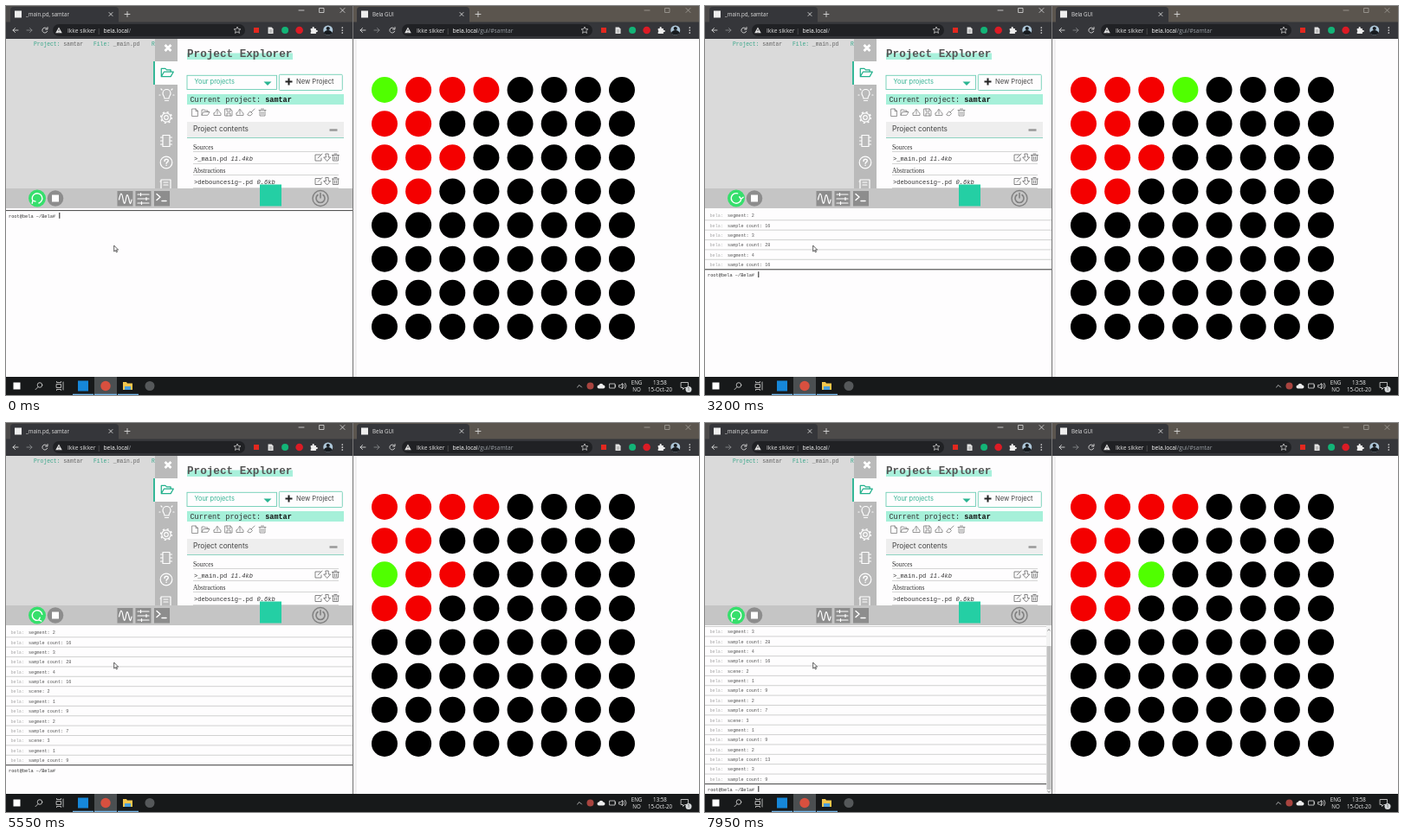
Animation of 800 by 450 pixels, one loop 8000 ms. Source, as an HTML page:

```html
<!DOCTYPE html>
<html lang="en">
<head>
<meta charset="utf-8">
<title>Sample sequencer</title>
<style>
html, body { margin: 0; width: 100%; height: 100%; overflow: hidden; background: #fff; }
svg { display: block; width: 800px; height: 450px; }
text { font-family: "Open Sans", "Noto Sans", sans-serif; white-space: pre; }
.mono { font-family: "Liberation Mono", monospace; }
.geo { font-family: Inter, sans-serif; }
.serif { font-family: "Liberation Serif", serif; }
.line { fill: none; stroke-linecap: round; stroke-linejoin: round; }
</style>
</head>
<body>
<svg id="stage" viewBox="0 0 800 450">
  <defs>
    <clipPath id="page"><rect y="38" width="400" height="173"/></clipPath>
    <clipPath id="console"><rect y="234" width="400" height="195.5"/></clipPath>
    <clipPath id="info"><rect y="38" width="172" height="20"/></clipPath>
    <g id="pencil" class="line"><path d="M2-3H-4V4H3V1M-1 1L4-4"/></g>
    <g id="arrow" class="line"><path d="M-1.5-4H1.5V0H4L0 4.5L-4 0H-1.5Z"/></g>
    <g id="bin" class="line"><path d="M-3-2.5V4H3V-2.5M-4-2.5H4M-1.5-4H1.5M-1-.5V2.5M1-.5V2.5"/></g>
    <g id="folder" class="line"><path d="M-4 3V-3H-1L0-2H3V-.5M-4 3L-2-.5H5L3 3Z"/></g>
    <g id="tray" class="line"><path d="M-4 1V3.5H4V1L2-.5M-4 1L-2-.5M0 2V-3.5M-2-1.5L0-3.5L2-1.5"/></g>
  </defs>
  <rect width="800" height="450" fill="#fefdfe"/>

  <g id="windows"></g>

  <g clip-path="url(#page)">
    <rect y="38" width="173" height="174" fill="#dadada"/>
    <g font-size="6.35" clip-path="url(#info)" fill="#666">
      <text class="mono" x="32" y="46.3"><tspan fill="#3aa78b">Project:</tspan> samtar</text>
      <text class="mono" x="101" y="46.3"><tspan fill="#3aa78b">File:</tspan> _main.pd</text>
      <text class="mono" x="168" y="46.3" fill="#3aa78b">Ru</text>
    </g>
    <rect x="172" y="38" width="26" height="174" fill="#bababa"/>
    <rect x="172" y="64" width="27" height="27" fill="#fefdfe"/>
    <rect x="170" y="64" width="2" height="27" fill="#35b898"/>
    <g class="line" stroke="#fff" stroke-width="1.2">
      <path d="M183.500 45l7 7m0-7l-7 7" stroke-width="2.800" stroke-linecap="butt"/>
      <use href="#folder" transform="translate(185.5 77) scale(1.55)" stroke="#22b08c" stroke-width=".8"/>
      <path d="M183 107c0-3-2-3-2-6a4.5 4.5 0 0 1 9 0c0 3-2 3-2 6zM183.5 109.5h4M178 103h-1M193 103h1M180 97l-1-1M191 97l1-1"/>
      <g transform="translate(185 129)">
        <circle r="2.3"/><circle r="5.2"/><circle r="6.3" stroke-width="1.6" stroke-dasharray="2 2.95" stroke-linecap="butt"/>
      </g>
      <path d="M181 149.500h8v13h-8zM178.500 152h2.500m-2.500 4h2.500m-2.500 4h2.500m8-8h2.500m-2.500 4h2.500m-2.500 4h2.500"/>
      <circle cx="185" cy="181" r="6.8"/>
      <path d="M183 179.500c0-3 4.300-3 4.300-.5c0 1.800-2.200 1.500-2.200 3.300m0 2v.1" stroke-width="1.4"/>
      <path d="M179 212v-11h11v11m-11-9h-1m4 1h5m-5 3h5"/>
    </g>

    <rect x="209" y="54.500" width="122" height="7.500" fill="#a8f0db"/>
    <text class="mono" x="209" y="59" font-size="12.65" font-weight="700" fill="#555">Project Explorer</text>
    <g fill="#fefdfe" stroke="#6fceb5" stroke-width=".9">
      <rect x="209" y="80.300" width="103.500" height="16.200"/>
      <rect x="315.300" y="79.300" width="73" height="18.200" rx="1"/>
    </g>
    <path d="M297.500 87.500h9l-4.500 4.500z" fill="#2bb592"/>
    <text class="geo" x="217.500" y="90.300" font-size="7.400" fill="#35b393">Your projects</text>
    <path d="M322.500 87.500h8m-4-4v8" stroke="#222" stroke-width="2"/>
    <text class="geo" x="335" y="90.300" font-size="7.600" fill="#444">New Project</text>
    <rect x="209" y="102" width="181" height="12" fill="#a6f0d9"/>
    <text class="mono" x="212.500" y="110.800" font-size="8.500" fill="#333">Current project: <tspan font-weight="700" fill="#111">samtar</tspan></text>
    <g class="line" stroke="#777" stroke-width=".75">
      <path d="M215 119h4l2.500 2.500v6h-6.500zM219 119v2.500h2.500"/>
      <use href="#folder" x="230" y="123"/>
      <use href="#tray" x="244" y="123"/>
      <path d="M253 119h6l2 2v6h-8zM255 119v3h4v-3M255 127v-3h4v3"/>
      <use href="#tray" x="270" y="123"/>
      <path d="M287 119l-4 4m-1-1l2.500 2.500l-2.500 2.500l-3-1z"/>
      <use href="#bin" x="296" y="123"/>
    </g>
    <rect x="209" y="134" width="181" height="18" fill="#eee"/>
    <path d="M209 152.500H390" stroke="#8fd3c2"/>
    <text class="geo" x="216" y="145.300" font-size="8.300" fill="#444">Project contents</text>
    <path d="M373.500 143.500h9" stroke="#999" stroke-width="2.500"/>
    <g fill="#333" font-size="7.400">
      <text class="serif" x="216" y="166">Sources</text>
      <text class="serif" x="216" y="193">Abstractions</text>
      <text class="mono" x="217" y="178.600" font-size="7.100">&gt;_main.pd <tspan font-style="italic">11.4kb</tspan></text>
      <text class="mono" x="217" y="206" font-size="7.100">&gt;debouncesig~.pd <tspan font-style="italic">0.6kb</tspan></text>
    </g>
    <path d="M216 168.500H384M216 182.500H384M216 195.500H384M216 210.500H384" stroke="#c4c4c4" stroke-width=".7"/>
    <g id="fileIcons" stroke="#666" stroke-width=".8"></g>
  </g>

  <rect y="211" width="400" height="23" fill="#c5c5c5"/>
  <circle cx="36" cy="222.500" r="10" fill="#36df6c"/>
  <g id="spinner" class="line" stroke="#fff" stroke-width="1.400">
    <path d="M-5 3A5.800 5.800 0 1 1 2 5.500M-5.800 5.800L-5 2.700L-2 3.600"/>
  </g>
  <circle cx="57" cy="222.500" r="9.300" fill="#8d8d8d"/>
  <rect x="53" y="218.500" width="8" height="8" fill="#fff"/>
  <g fill="#8d8d8d">
    <rect x="128.500" y="214" width="18" height="17.500"/>
    <rect x="149.500" y="214" width="18" height="17.500"/>
    <rect x="171" y="214" width="18" height="17.500"/>
  </g>
  <g class="line" stroke="#fff" stroke-width="1.200">
    <path d="M130.500 224c2-9 3-9 4.500-1s2.500 6 3.500 0s2-6 3.500 1s2 5 3 0"/>
    <path d="M152 218h13m-13 5h13m-13 5h13M155.500 216.500v3M162 221.500v3M156.500 226.500v3"/>
    <path d="M174 217.500l4 3.500l-4 3.500M180 225.500h5" stroke-width="1.500"/>
  </g>
  <rect x="293" y="206.500" width="25" height="25" fill="#24cfa4"/>
  <g class="line" stroke="#808080" stroke-width="1.400">
    <circle cx="363" cy="222.500" r="9"/>
    <path d="M360 218.500a5 5 0 1 0 6 0M363 216.500v5.500" stroke-width="1.600"/>
  </g>

  <g clip-path="url(#console)">
    <rect y="234" width="400" height="196" fill="#fefdfe"/>
    <g id="scroller">
      <g id="rows"></g>
      <g id="prompt">
        <rect y="236" width="400" height="1.100" fill="#555"/>
        <text class="mono" x="3" y="244.700" font-size="5.300" fill="#333">root@bela ~/Bela#</text>
        <rect id="caret" x="61.300" y="239" width="1" height="6.800" fill="#222"/>
      </g>
    </g>
    <g id="scrollbar">
      <rect x="394" y="234" width="6" height="196" fill="#f3f3f3"/>
      <rect x="394.500" y="258" width="5" height="166" fill="#c2c2c2"/>
      <path d="M395.500 240.500l1.500-2l1.500 2M395.500 425.500l1.500 2l1.500-2" fill="none" stroke="#777" stroke-width=".8"/>
    </g>
  </g>
  <rect x="400" width="1" height="429" fill="#777"/>
  <rect x="401" y="38" width="4" height="391" fill="#f1f0f1"/>

  <g id="grid"></g>
  <path d="M124.700 277v7l1.600-1.500l1.100 2.400l1.100-.5l-1.100-2.300h2.200z" fill="#fff" stroke="#222" stroke-width=".7"/>

  <g id="taskbar">
    <rect y="429" width="800" height="21" fill="#17191a"/>
    <rect x="102" y="429" width="26" height="21" fill="#4b4f51"/>
    <rect x="8.500" y="435.500" width="8" height="8" fill="#fff"/>
    <g class="line" stroke="#ddd" stroke-width=".8">
      <circle cx="39" cy="438.500" r="2.800"/><path d="M37 440.700l-3 3"/>
      <path d="M58.500 437.500h5v4h-5zM58.500 434.500v1h5v-1M58.500 444.500v-1h5v1M66 435v9"/>
      <path d="M659.500 441l2.500-2.500l2.500 2.500"/>
      <path d="M697 437h6v5h-6zM703.500 438.500v2"/>
      <path d="M708 438.500h1.500l2-2v6.500l-2-2h-1.500zM713 437.500q1.500 2 0 4M714.800 436.300q2.500 3.200 0 6.500"/>
      <path d="M779.500 435.500h8v6h-4l-2 2v-2h-2z"/>
    </g>
    <rect x="83" y="433.500" width="12" height="12" fill="#1687d9"/>
    <circle cx="115" cy="439.500" r="5.700" fill="#d8503f"/>
    <path d="M135 435h4l1 1.500h6v7.500h-11z" fill="#f4c64d"/>
    <path d="M137 440h7v4h-7z" fill="#4b9fdd"/>
    <circle cx="166" cy="439.500" r="5.500" fill="#55585a"/>
    <path d="M77 449.300h24M102 449.300h26M129 449.300h24" stroke="#76b9ed" stroke-width="1.300"/>
    <circle cx="674.500" cy="439.500" r="4" fill="#a8443f"/>
    <path d="M684.500 442.500a2 2 0 0 1 0-4a2.700 2.700 0 0 1 5 0a2 2 0 0 1 0 4z" fill="#eee"/>
    <circle cx="788" cy="443.500" r="3.500" fill="#d5d8da"/>
    <g fill="#eee" font-size="6.200" text-anchor="middle">
      <text x="728" y="437.500">ENG</text><text x="728" y="446.300">NO</text>
      <text x="755" y="437.500">13:58</text><text x="755" y="446.300">15-Oct-20</text>
      <text x="788" y="445.400" font-size="5" fill="#222">1</text>
    </g>
  </g>
</svg>
<script>
const LOOP = 8000, ROW = 11.37, BLINK = 530, GREEN_DELAY = 180;
const $ = id => document.getElementById(id);

// Each entry: time, scene, segment, sample count, whether the scene is announced.
const events = [
  [800, 1, 2, 16], [1480, 1, 3, 28], [2000, 1, 4, 16], [3550, 2, 1, 9, true],
  [4400, 2, 2, 7], [5000, 3, 1, 9, true], [5900, 3, 2, 13], [6420, 3, 3, 9]
];
const segments = [4, 2, 3, 2];

function browser(o) {
  const { x, width, strip, tab, tabWidth, title, path, omni, star, dim } = o;
  const right = x + width;
  const ext = i => star + 22 + i * 16.55;
  const ctl = dim ? '#a5a19b' : '#ddd';
  return `
    <rect x="${x}" width="${width}" height="38" fill="${strip}"/>
    <rect x="${x}" y="18.500" width="${width}" height="19.500" fill="#35363a"/>
    <path d="M${tab} 19V5q0-4 4-4h${tabWidth - 8}q4 0 4 4v14z" fill="#35363a"/>
    <rect x="${tab + 5}" y="5.500" width="8" height="8" fill="#eee"/>
    <text x="${tab + 18}" y="12" font-size="6.200" fill="#ddd">${title}</text>
    <g class="line" stroke="#d8d8d8" stroke-width=".9">
      <path d="M${tab + tabWidth - 11} 7.500l4 4m0-4l-4 4M${tab + tabWidth + 7} 9.500h6m-3-3v6"/>
      <path d="M${x + 14} 28h-6m2.500-2.500l-2.500 2.500l2.500 2.500"/>
      <path d="M${x + 24} 28h6m-2.500-2.500l2.500 2.500l-2.500 2.500" stroke="#85878a"/>
      <path d="M${x + 47.500} 26.500a3 3 0 1 0 .2 2.700M${x + 48} 24.500v2.500h-2.500"/>
    </g>
    <g class="line" stroke="${ctl}" stroke-width=".8">
      <path d="M${right - 63} 5h6M${right - 39} 2.500h5v5h-5zM${right - 15} 2.500l5 5m0-5l-5 5"/>
    </g>
    <rect x="${omni}" y="21" width="${star + 9 - omni}" height="14" rx="7" fill="#202124"/>
    <path d="M${omni + 7} 24.500l3.800 6.800h-7.600z" fill="#ddd"/>
    <path d="M${omni + 7} 27v2m0 1v.6" stroke="#222" stroke-width=".8"/>
    <text x="${omni + 17}" y="30.500" font-size="6.700" fill="#ddd">Ikke sikker<tspan fill="#777"> | </tspan><tspan fill="#fff"> bela.local</tspan><tspan fill="#9aa0a6">${path}</tspan></text>
    <path d="M${star} 24l1.100 2.600l2.800.2l-2.100 1.800l.7 2.800l-2.500-1.500l-2.500 1.500l.7-2.800l-2.100-1.800l2.800-.2z" fill="none" stroke="#ccc" stroke-width=".8"/>
    <rect x="${ext(0) - 3}" y="25" width="6" height="6" fill="#e3281f"/>
    <path d="M${ext(1) - 3} 24.500h4l2 2v5.500h-6z" fill="#e3e3e3"/>
    <path d="M${ext(1) - 1.500} 28h3m-3 2h3" stroke="#777" stroke-width=".7"/>
    <circle cx="${ext(2)}" cy="28" r="4" fill="#13b477"/>
    <circle cx="${ext(3)}" cy="28" r="4.300" fill="#dc1b25"/>
    <path d="M${ext(4) - 3.500} 26h2q-.6-2 1-2t1 2h2.200v2q2-.5 2 1t-2 1v2h-6.200v-2q1.500-.5 0-2z" fill="#eee"/>
    <circle cx="${ext(5)}" cy="28" r="5.500" fill="#adc6d8"/>
    <circle cx="${ext(5)}" cy="26" r="2.100" fill="#171b1f"/>
    <path d="M${ext(5) - 5} 31.500q1-3.500 5-3.500t5 3.500q-5 4-10 0" fill="#171b1f"/>
    <g fill="#ddd">${[25, 28, 31].map(y => `<circle cx="${ext(6)}" cy="${y}" r=".85"/>`).join('')}</g>`;
}

$('windows').innerHTML =
  browser({ x: 0, width: 401, strip: '#4d4b4a', tab: 5, tabWidth: 125, title: '_main.pd, samtar',
    path: '/', omni: 54, star: 267 }) +
  browser({ x: 401, width: 399, strip: '#5b554e', tab: 405, tabWidth: 130, title: 'Bela GUI',
    path: '/gui/#samtar', omni: 457, star: 668, dim: true });

$('fileIcons').innerHTML = [175, 202.5].map(y =>
  ['pencil', 'arrow', 'bin'].map((icon, i) => `<use href="#${icon}" x="${361 + i * 9.7}" y="${y}"/>`).join('')
).join('');

const lines = events.flatMap(([time, scene, segment, count, announced]) => [
  ...(announced ? [`scene: ${scene}`] : []), `segment: ${segment}`, `sample count: ${count}`
].map(label => ({ time, label })));

$('rows').innerHTML = lines.map(({ label }, i) => `<g transform="translate(0 ${i * ROW})">
  <text class="mono" x="5.500" y="244.200" font-size="5.150" fill="#aaa">bela:</text>
  <text class="mono" x="26" y="244.200" font-size="5.150" fill="#555">${label}</text>
  <path d="M0 247.800H400" stroke="#ccc" stroke-width=".9"/></g>`).join('');
const rows = [...$('rows').children];

const PITCH = 39.14;
$('grid').innerHTML = Array.from({ length: 64 }, (_, i) =>
  `<circle cx="${437 + i % 8 * PITCH}" cy="${97 + Math.floor(i / 8) * PITCH}" r="15"/>`).join('');
const dots = [...$('grid').children];

function draw(t) {
  const [since, scene, segment] = events.filter(e => e[0] <= t).pop() || [0, 1, 1];
  const lit = since === 0 || t - since >= GREEN_DELAY;
  dots.forEach((dot, i) => {
    const row = Math.floor(i / 8), col = i % 8;
    const playing = lit && row === scene - 1 && col === segment - 1;
    dot.setAttribute('fill', playing ? '#50ff00' : col < (segments[row] || 0) ? '#f40000' : '#000');
  });

  const shown = lines.filter(l => l.time <= t).length;
  const scroll = Math.max(0, shown * ROW - 181);
  rows.forEach((row, i) => row.style.display = i < shown ? '' : 'none');
  $('prompt').setAttribute('transform', `translate(0 ${shown * ROW})`);
  $('scroller').setAttribute('transform', `translate(0 ${-scroll})`);
  $('scrollbar').style.display = scroll ? '' : 'none';
  $('caret').style.display = (t - since) % (2 * BLINK) < BLINK ? '' : 'none';
  $('spinner').setAttribute('transform', `translate(36 222.500) rotate(${t / 2000 * 360})`);
}

const start = performance.now();
function tick() {
  draw((performance.now() - start) % LOOP);
  requestAnimationFrame(tick);
}
tick();
</script>
</body>
</html>
```
